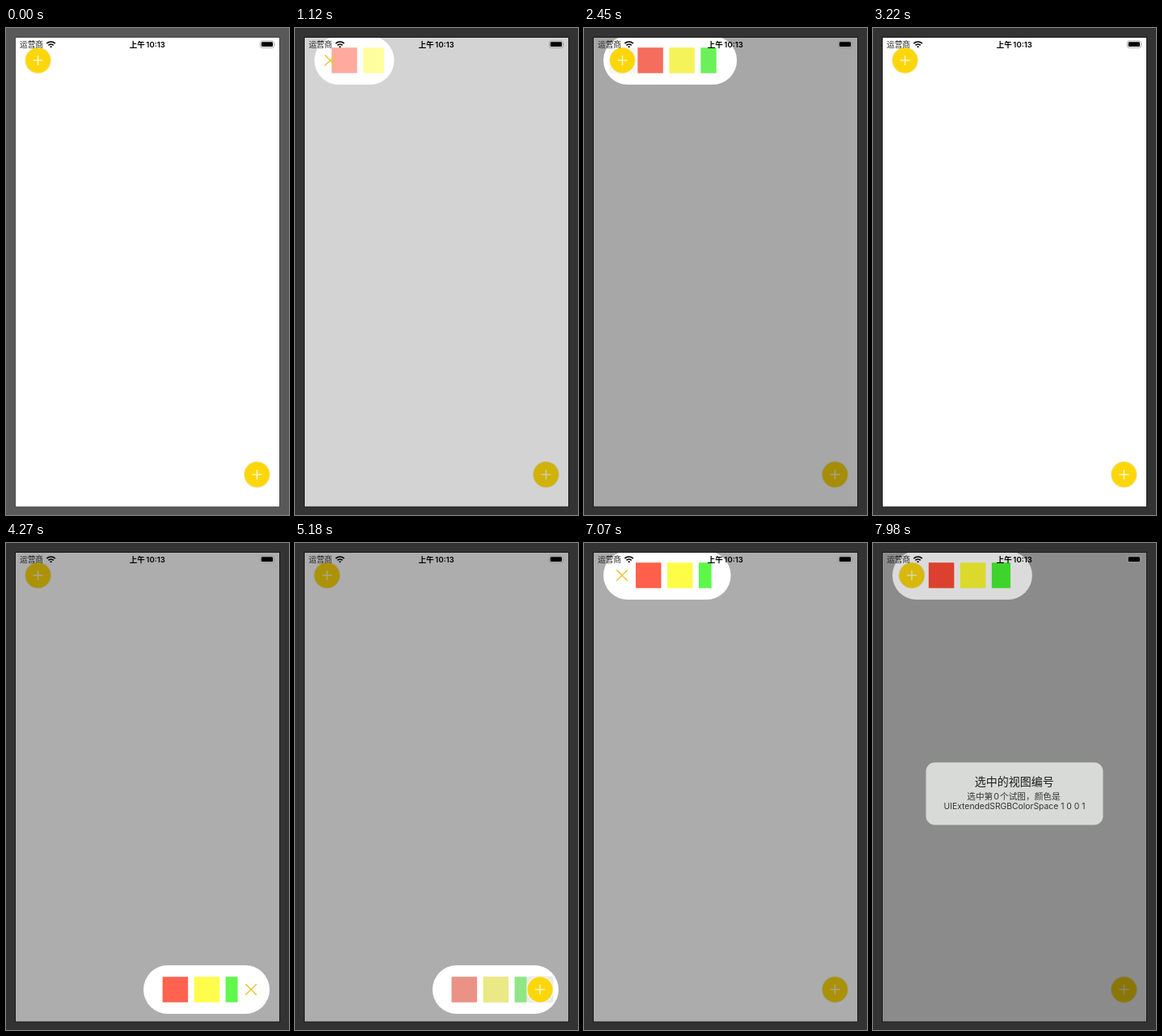
An HTML page that plays this animation: 350x602 px, repeating every 8 s.

```html
<!DOCTYPE html>
<html lang="zh">
<head>
<meta charset="utf-8">
<title>Expanding menu</title>
<style>
  html, body { margin: 0; width: 100%; height: 100%; overflow: hidden; background: #333; }
  svg { display: block; width: 350px; height: 602px; }
  text { font-family: Inter, "Noto Sans CJK SC", "Noto Sans CJK", sans-serif; }
  .mid { text-anchor: middle; }
</style>
</head>
<body>
<svg id="stage" viewBox="0 0 350 602">
  <defs>
    <clipPath id="screen"><rect x="12" y="12" width="326" height="580"/></clipPath>
  </defs>
  <rect id="frame" width="350" height="602"/>
  <rect id="edge" x="11.5" y="11.5" width="327" height="580.5" fill="#fff" stroke-width="1"/>
  <g id="idle"></g>
  <g clip-path="url(#screen)">
    <rect id="dim" x="12" y="12" width="326" height="580"/>
    <g id="menu"></g>
    <rect id="alertDim" x="12" y="12" width="326" height="580"/>
  </g>
  <g id="alert">
    <rect x="66.3" y="271.5" width="217.4" height="76.8" rx="11" fill="#d9dbd8"/>
    <g class="mid" fill="#333">
      <text x="174.8" y="300.3" font-size="13.9" font-weight="500" fill="#1c1c1c">选中的视图编号</text>
      <text x="174" y="316.6" font-size="10.6">选中第<tspan dx="1">0</tspan><tspan dx="1">个</tspan>试图，颜色是</text>
      <text x="175" y="329.3" font-size="10.3">UIExtendedSRGBColorSpace 1 0 0 1</text>
    </g>
  </g>
  <g id="status">
    <text x="17" y="24.3" font-size="9.7" fill="#222">运营商</text>
    <g fill="none" stroke="#000" stroke-width="1.7">
      <path d="M50.4 19.2a7.3 7.3 0 0 1 10.4 0M52.5 21.3a4.4 4.4 0 0 1 6.2 0"/>
      <path d="M55.6 24.6l-1.5-1.6a2.1 2.1 0 0 1 3 0z" fill="#000" stroke="none"/>
    </g>
    <text class="mid" x="174.8" y="24.2" font-size="9.5" font-weight="600">上午<tspan dx="1.5">10:13</tspan></text>
    <rect x="314.4" y="15.9" width="17" height="8.6" rx="2.5" fill="none" stroke="#999" stroke-width=".8"/>
    <rect x="315.8" y="17.3" width="14.2" height="5.8" rx="1.4"/>
    <path d="M332.3 18.7q1.4 1.5 0 3z" fill="#999"/>
  </g>
</svg>
<script>
const LOOP = 8000, CELL = 31.5, STEP = 39, DIM = 0.4;
const COLORS = ['#ff3b22', '#fffc1e', '#37f71e'];
// edge: the fixed side of the pill; dir: direction in which it grows
const CORNERS = [{ edge: 24, dir: 1, y: 40 }, { edge: 326, dir: -1, y: 552 }];
// start, duration, corner, opening
const MOVES = [
  [870, 865, 0, true], [2130, 1020, 0, false],
  [3600, 1088, 1, true], [4790, 1020, 1, false],
  [6610, 734, 0, true], [7730, 1020, 0, false]
];
const ALERT = { start: 7700, time: 360 };

const $ = id => document.getElementById(id);
const clamp = v => Math.max(0, Math.min(1, v));
const set = (el, attrs) => { for (const k in attrs) el.setAttribute(k, attrs[k]); return el; };
const add = (parent, tag, attrs) =>
  parent.appendChild(set(document.createElementNS('http://www.w3.org/2000/svg', tag), attrs || {}));

// cubic-bezier(x1, 0, x2, 1)
function bezier(x, x1, x2) {
  let lo = 0, hi = 1;
  for (let i = 0; i < 24; i++) {
    const s = (lo + hi) / 2, r = 1 - s;
    if (3 * r * r * s * x1 + 3 * r * s * s * x2 + s * s * s < x) lo = s; else hi = s;
  }
  return lo * lo * (3 - 2 * lo);
}

function plusButton(parent) {
  const g = add(parent, 'g');
  add(g, 'circle', { r: 16.4, fill: '#f1e9c4' });
  add(g, 'circle', { r: 15.4, fill: '#fbd70a' });
  add(g, 'path', { d: 'M-6 0H6M0-6V6', stroke: '#fff6cc', 'stroke-width': 1.5 });
  return g;
}
const place = (el, x, y) => set(el, { transform: `translate(${x} ${y})` });
const show = (el, on) => set(el, { visibility: on ? 'visible' : 'hidden' });

const idle = CORNERS.map(c => place(plusButton($('idle')), c.edge + c.dir * 15.6, c.y));
const menu = $('menu');
const pill = add(menu, 'rect', { height: 60, fill: '#fff' });
const cells = COLORS.map(fill => add(menu, 'rect', { height: CELL, fill }));
const holes = add(menu, 'g');
const gaps = COLORS.map(() => add(holes, 'rect', { height: CELL + 1, rx: 1 }));
const seat = add(holes, 'rect', { width: 33, height: 33, rx: 4 });
const ring = add(holes, 'circle', { r: 17, fill: '#fff' });
const plus = plusButton(menu);
const cross = add(menu, 'path', { d: 'M-6.8-6.8L6.8 6.8M6.8-6.8L-6.8 6.8', stroke: '#e9c637', 'stroke-width': 1.5 });

function drawMenu(corner, p, opening) {
  const { edge, dir, y } = corner;
  const w = 31.5 + 155.5 * p, inner = 49.3 * p, outer = 29.5 * p;
  const left = dir > 0 ? edge : edge - w;
  const from = left + (dir > 0 ? inner : outer);
  const to = left + w - (dir > 0 ? outer : inner);
  set(pill, { x: left, y: y - 30, width: w, rx: Math.min(30, w / 2), ry: 30 });

  const gone = opening ? 0 : clamp((0.9 - p) / 0.4);
  const size = i => Math.max(0, Math.min(CELL, to - from - i * STEP));
  cells.forEach((c, i) => set(c, { x: from + i * STEP, y: y - CELL / 2, width: size(i), opacity: p * (1 - gone) }));

  const bx = edge + dir * (15.6 + 9.2 * p);
  const grey = Math.round(255 * (1 - DIM * p));
  set(holes, { opacity: gone, fill: `rgb(${grey},${grey},${grey})` });
  gaps.forEach((g, i) => set(g, { x: from + i * STEP, y: y - CELL / 2 - 0.5, width: size(i) }));
  set(seat, { x: bx - 16.5, y: y - 16.5 });
  place(ring, bx, y);
  place(plus, bx, y).style.display = opening ? 'none' : '';
  place(cross, bx, y).style.display = opening ? '' : 'none';
}

function draw(t) {
  const fade = Math.min(3, Math.floor(t / 70)) / 3;
  const tone = Math.round(89 - 38 * fade), line = Math.round(72 - 48 * fade);
  set($('frame'), { fill: `rgb(${tone},${tone},${tone})` });
  set($('edge'), { stroke: `rgb(${line},${line},${line})` });

  let p = 0, active = -1;
  const move = MOVES.filter(m => t >= m[0]).pop();
  if (move) {
    const [start, time, corner, opening] = move;
    const k = clamp((t - start) / time);
    p = opening ? bezier(k, 0, 0.58) : 1 - bezier(k, 0.42, 1);
    if (p > 0.001) {
      active = corner;
      drawMenu(CORNERS[corner], p, opening);
    }
  }
  menu.style.display = active < 0 ? 'none' : '';
  idle.forEach((b, i) => show(b, i !== active));
  set($('dim'), { opacity: DIM * p });

  const k = clamp((t - ALERT.start) / ALERT.time), a = 1 - (1 - k) ** 2;
  const s = 1.15 - 0.15 * a;
  set($('alertDim'), { opacity: 0.147 * a });
  set($('alert'), { opacity: Math.min(1, a * 1.04), transform: `translate(175 310) scale(${s}) translate(-175 -310)` });
}

const origin = performance.now();
function tick() {
  draw((performance.now() - origin) % LOOP);
  requestAnimationFrame(tick);
}
tick();
</script>
</body>
</html>
```
